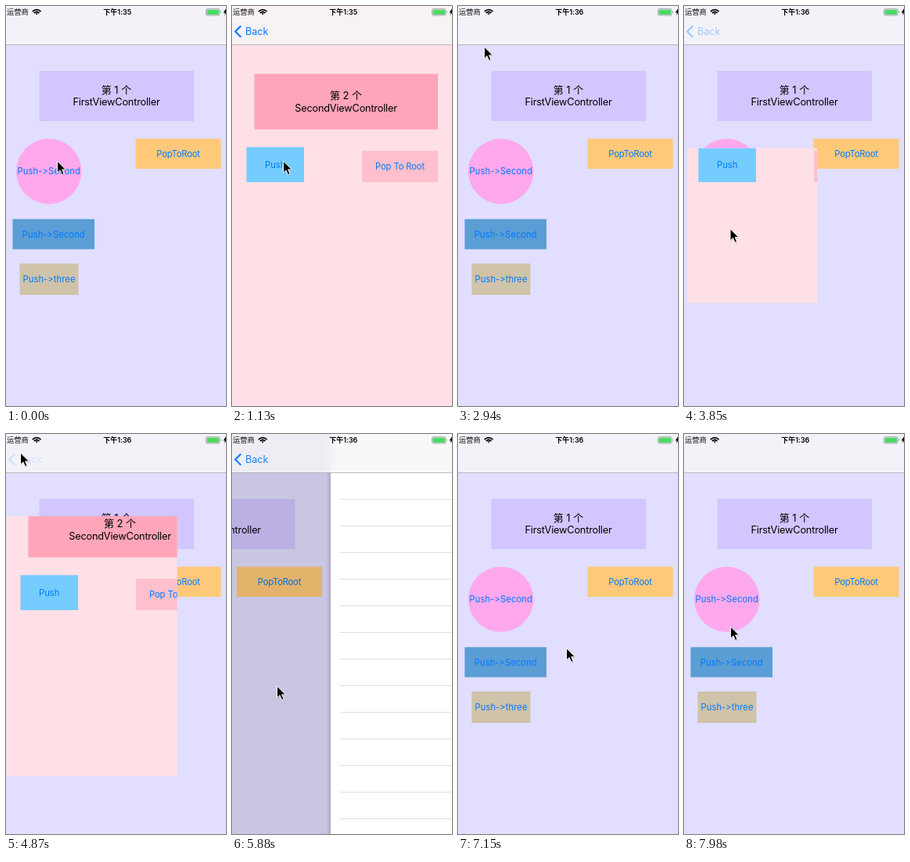
Recreate the animation shown at these times as an HTML page. Size 281x511 px, loop 8 s.

```html
<!DOCTYPE html>
<html lang="zh-CN">
<head>
<meta charset="utf-8">
<title>Navigation transitions</title>
<style>
  html, body { margin: 0; width: 100%; height: 100%; overflow: hidden; background: #e1deff; }
  svg { position: absolute; left: 0; top: 0; width: 281px; height: 511px; }
  text {
    font-family: Inter, "Noto Sans CJK SC", "Noto Sans CJK", sans-serif;
    font-feature-settings: "calt" 0, "liga" 0;
  }
  #bar {
    position: absolute; left: 0; top: 0; width: 281px; height: 49px;
    background: rgba(248, 247, 248, .8);
    backdrop-filter: blur(8px);
    border-bottom: 1px solid rgba(0, 0, 0, .24);
  }
</style>
</head>
<body>
<svg id="scene" viewBox="0 0 281 511"></svg>
<div id="bar"></div>
<svg id="front" viewBox="0 0 281 511"></svg>
<script>
const W = 281, H = 511, LOOP = 8000;
const BLUE = '#007aff';
const $ = id => document.getElementById(id);

const box = (x, y, w, h, fill, rx = 0) =>
  `<rect x="${x}" y="${y}" width="${w}" height="${h}" rx="${rx}" fill="${fill}"/>`;
const label = (x, y, str, size, fill, spacing = 0, anchor = 'middle') =>
  `<text x="${x}" y="${y}" font-size="${size}" fill="${fill}" letter-spacing="${spacing}" text-anchor="${anchor}">${str}</text>`;
const title = (x, y, n, name) =>
  label(x, y, `第 ${n} 个`, 13, '#000') + label(x, y + 15.5, name, 12.74, '#000', -.2);
const button = (x, y, w, h, fill, str, spacing = 0, rx = 0) =>
  box(x, y, w, h, fill, rx) + label(x + w / 2, y + h / 2 + 4, str, 11.24, BLUE, spacing);

const firstView =
  box(0, 0, W, H, '#e1deff') +
  box(42.5, 83, 197.5, 64, '#d3c6ff') +
  title(141, 111.5, 1, 'FirstViewController') +
  button(13, 169.5, 83.5, 83.5, '#ffa8ee', 'Push-&gt;Second', .1, 42) +
  button(165.5, 169.5, 109, 38.5, '#ffc979', 'PopToRoot', -.2) +
  button(8.5, 272.3, 104.5, 38.4, '#5b9dd5', 'Push-&gt;Second', .05) +
  button(17.5, 329, 75, 40, '#cfc3a9', 'Push-&gt;three', .05);

const secondView =
  box(0, 0, W, H, '#ffe0e6') +
  box(28.5, 86.7, 234.5, 71, '#ffa5b9') +
  title(145.5, 119, 2, 'SecondViewController') +
  button(18.5, 180.3, 73.5, 44.7, '#75ccff', 'Push') +
  button(166, 185, 97, 40, '#ffbfcc', 'Pop To Root', -.12);

let rows = '';
for (let y = 83; y < H; y += 34) rows += box(11.5, y, W, 1, '#dfdee3');

$('scene').innerHTML = `
  <defs>
    <clipPath id="mask"><rect id="hole"/></clipPath>
    <linearGradient id="shade">
      <stop offset="0" stop-color="#000" stop-opacity="0"/>
      <stop offset="1" stop-color="#000" stop-opacity=".14"/>
    </linearGradient>
  </defs>
  ${box(0, 0, W, H, '#e1deff')}
  <g id="first">${firstView}</g>
  <rect id="dim" width="${W}" height="${H}"/>
  <g id="second">${secondView}</g>
  <g id="table">${box(-6, 0, 6, H, 'url(#shade)')}${box(0, 0, W, H, '#fff')}${rows}</g>`;

const arrow = 'M0 0V15L3.5 11.8L6 17.6L8.6 16.5L6.2 10.9H10.9Z';

$('front').innerHTML = `
  ${label(1, 11, '运营商', 9.3, '#111', 0, 'start')}
  <g fill="none" stroke="#000" stroke-width="1.7">
    <path d="M33.8 7.1Q39.2 2.1 44.6 7.1M35.9 9Q39.2 6 42.5 9"/>
    <path d="M37.6 9.7L39.2 11.6L40.8 9.7Q39.2 8.6 37.6 9.7Z" fill="#000" stroke="none"/>
  </g>
  <text id="clock" x="142.3" y="11" font-size="9" font-weight="600" text-anchor="middle"></text>
  <rect x="255.5" y="3.7" width="17.5" height="8.3" rx="1.8" fill="none" stroke="#8b8b90" stroke-width=".8"/>
  ${box(256.5, 4.7, 15.5, 6.3, '#4cd964', 1)}
  <path d="M274 6.3q1.6 1.5 0 3z" fill="#8b8b90"/>
  <path d="M281 3.2L277.6 8.4H279.8L279 12L282 7.4Z"/>
  <g id="back">
    <path d="M11.4 25.4L4.2 32.6L11.4 39.8" fill="none" stroke="${BLUE}" stroke-width="2.2"/>
    ${label(17, 37, 'Back', 12.74, BLUE, -.1, 'start')}
  </g>
  <g id="cursor">
    <path d="${arrow}" transform="translate(.5 1)" opacity=".25"/>
    <path d="${arrow}" stroke="#fff"/>
  </g>`;

const mix = (a, b, p) => a + (b - a) * p;
const ramp = (t, start, end) => Math.min(1, Math.max(0, (t - start) / (end - start)));
const smooth = (t, start, end) => {
  const p = ramp(t, start, end);
  return p * p * (3 - 2 * p);
};

// Each reveal grows from its button's edges (left, top, right, bottom) over the stage.
const circle = {
  push: 830, press: 2340, pop: 2620, rx: 999,
  from: [13, 169.5, 96.5, 253], to: [-335, -179, 445, 601]
};
const sheet = {
  push: 3750, press: 4660, pop: 4870, rx: 0,
  from: [8.5, 272.3, 113, 310.7], to: [-4, 3, 283, 514]
};

const revealed = ({ push, pop }, t) =>
  t < pop ? ramp(t, push, push + 300) : .625 * (1 - ramp(t, pop, pop + 180));

const swipeAt = 6500;
const tableLeft = t => t < swipeAt
  ? W * (1 - smooth(t, 5694, 6044))
  : W * smooth(t, swipeAt, 7066);

// Pointer moves: start, end, x, y.
const moves = [
  [1790, 2380, 28, 40], [2880, 2940, 33.5, 52],
  [2940, 3730, 60, 291], [3790, 4450, 18.5, 24],
  [5050, 5670, 57.5, 322], [5900, 6350, 52, 305],
  [swipeAt, 6900, 215, 298], [6900, 7270, 114, 266],
  [7330, 7620, 58.5, 209], [7900, 7980, 59.5, 246]
];

function pointer(t) {
  let x = 65.5, y = 198;
  for (const [start, end, toX, toY] of moves) {
    const p = smooth(t, start, end);
    x = mix(x, toX, p);
    y = mix(y, toY, p);
  }
  return [x, y];
}

function setAttrs(id, attrs) {
  for (const name in attrs) $(id).setAttribute(name, attrs[name]);
}

function draw(t) {
  const shape = t < 3400 ? circle : sheet;
  const shown = revealed(shape, t);
  const [l, top, r, b] = shape.from.map((v, i) => mix(v, shape.to[i], shown));
  setAttrs('hole', { x: l, y: top, width: r - l, height: b - top, rx: shape.rx });
  setAttrs('second', {
    'clip-path': shown < 1 ? 'url(#mask)' : 'none',
    display: shown > 0 ? 'inline' : 'none'
  });

  const x = tableLeft(t);
  const parallax = t < swipeAt ? 1.03 : .308;
  setAttrs('table', { transform: `translate(${x})`, display: x < W ? 'inline' : 'none' });
  setAttrs('first', { transform: `translate(${(x - W) * parallax})` });
  setAttrs('dim', { opacity: .2 * (1 - x / W) });

  const maskBack = shown * (t < shape.press ? 1 : .23);
  const tableBack = t < swipeAt ? ramp(t, 5730, 5895) : 1 - 2.2 * x / W;
  setAttrs('back', { opacity: Math.max(0, maskBack, tableBack) });

  setAttrs('cursor', { transform: `translate(${pointer(t)})` });
  $('clock').textContent = t < 2100 ? '下午1:35' : '下午1:36';
}

function tick() {
  draw(performance.now() % LOOP);
  requestAnimationFrame(tick);
}
tick();
</script>
</body>
</html>
```
